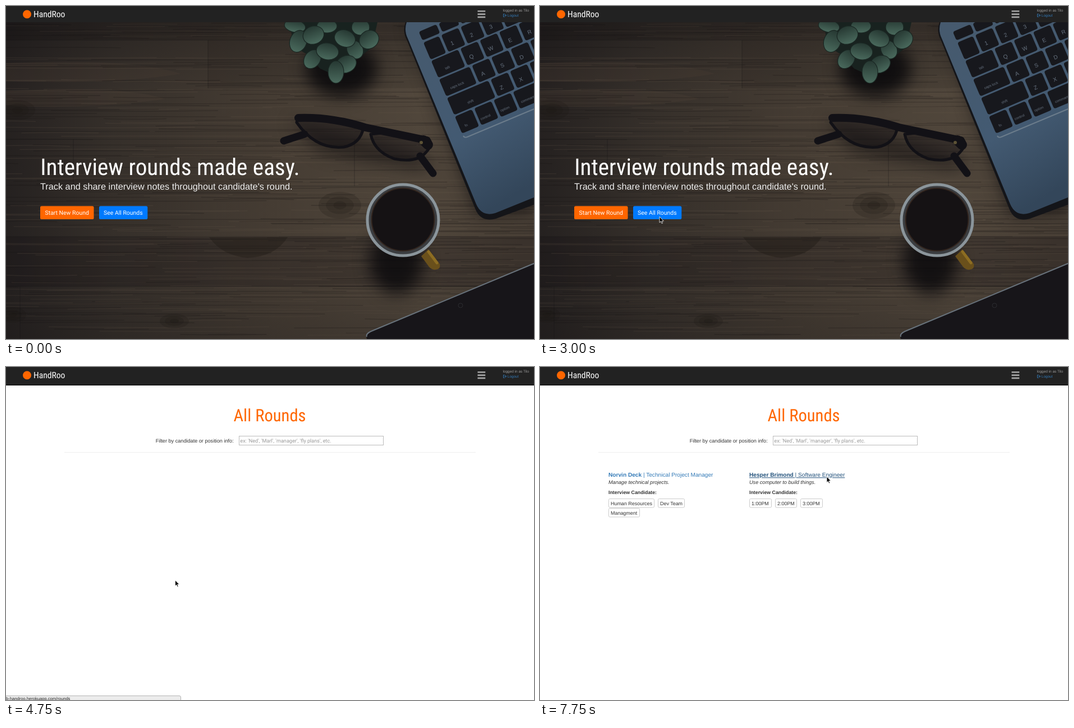
An HTML page for the animation above (8000 ms loop, 941 by 595 pixels).

```html
<!DOCTYPE html>
<html lang="en">
<head>
<meta charset="utf-8">
<title>Interview rounds</title>
<style>
html, body { margin: 0; width: 100%; height: 100%; overflow: hidden; background: #fff; }
svg { display: block; width: 941px; height: 595px; }
text { font: 9.15px "Liberation Sans", Arial, sans-serif; fill: #333; text-rendering: geometricPrecision; white-space: pre; }
.narrow { font-family: "Roboto Condensed", Roboto, sans-serif; font-stretch: 75%; }
.roboto { font-family: Roboto, sans-serif; }
#brand { font-size: calc(15.6px * var(--fit, 1)); fill: #fff; }
#title { font-size: calc(41.2px * var(--fit, 1)); fill: #fff; }
#heading { font-size: calc(30.6px * var(--fit, 1)); fill: #f60; }
.lead { font-size: 16.3px; fill: #f0f0f0; }
.button { font-size: 10.46px; fill: #fff; }
.small { font-size: 6.45px; fill: #9d9d9d; }
.link { font-size: 10.14px; fill: #337ab7; }
.link.hover { fill: #23527c; text-decoration: underline; }
.bold { font-weight: bold; }
.about { font-style: italic; }
.label { font-size: 8.8px; font-weight: bold; }
.tag { font-size: 8.95px; }
.box { fill: #fff; stroke: #ccc; }
.key { fill: #66717f; text-anchor: middle; }
</style>
</head>
<body>
<svg viewBox="0 0 941 595">
  <defs>
    <linearGradient id="wood">
      <stop offset="0" stop-color="#252120"/><stop offset=".2" stop-color="#352f2a"/>
      <stop offset=".5" stop-color="#453c33"/><stop offset=".78" stop-color="#50463b"/>
      <stop offset="1" stop-color="#463d34"/>
    </linearGradient>
    <linearGradient id="shade" x2="0" y2="1">
      <stop offset="0" stop-color="#0e0d10" stop-opacity=".36"/><stop offset=".25" stop-color="#0e0d10" stop-opacity="0"/>
      <stop offset=".75" stop-color="#0e0d10" stop-opacity="0"/><stop offset="1" stop-color="#0e0d10" stop-opacity=".2"/>
    </linearGradient>
    <linearGradient id="metal" x1=".2" x2=".6" y2="1">
      <stop offset="0" stop-color="#465a6e"/><stop offset=".6" stop-color="#435a72"/><stop offset="1" stop-color="#33465a"/>
    </linearGradient>
    <linearGradient id="leaf" x2="0" y2="1">
      <stop offset="0" stop-color="#263832"/><stop offset="1" stop-color="#4a6a5d"/>
    </linearGradient>
    <filter id="blur" x="-50%" y="-50%" width="200%" height="200%" color-interpolation-filters="sRGB">
      <feGaussianBlur stdDeviation="14"/>
    </filter>
  </defs>

  <g id="home">
    <rect width="941" height="595" fill="url(#wood)"/>
    <g fill="#0f0d0e">
      <rect y="29" width="941" height="32" opacity=".2"/>
      <rect x="360" y="61" width="400" height="86" opacity=".1"/>
      <rect y="412" width="941" height="89" opacity=".22"/>
    </g>
    <g fill="#4c4136" opacity=".3">
      <path d="M0 102Q220 92 312 121Q200 140 0 134ZM0 152Q210 142 284 166Q150 186 0 178Z"/>
    </g>
    <g fill="none" stroke-width="1.3">
      <path id="darkGrain" stroke="#141112" opacity=".26"/>
      <path id="lightGrain" stroke="#6b5b4a" opacity=".2"/>
    </g>
    <g id="knots" fill="#1d1713"></g>
    <path d="M362 413H502Q480 448 430 450Q385 446 362 413Z" fill="#201a15" opacity=".4"/>
    <path d="M0 61H760M0 238H941M120 322H941M0 412H941M0 501H941M360 61V147M120 238V322M621 238V322M25 501V595" fill="none" stroke="#151213" opacity=".35"/>
    <rect width="941" height="595" fill="url(#shade)"/>

    <g fill="#0c0b0d" filter="url(#blur)">
      <ellipse cx="598" cy="112" rx="64" ry="50" opacity=".9"/>
      <ellipse cx="696" cy="456" rx="48" ry="58" opacity=".85"/>
      <path d="M716 30L840 376L941 366V30Z" opacity=".6"/>
      <path d="M505 205L640 235L765 275L740 296L560 262Z" opacity=".5"/>
    </g>
    <path d="M506 29H662L652 74L622 98L596 128L560 112L536 86L512 72Z" fill="#18221f"/>
    <g id="leaves" fill="url(#leaf)" stroke="#1a2723" stroke-width="1.2"></g>

    <path d="M712 29Q706 46 715 62L837 364Q847 387 873 380L941 355V29Z" fill="#141519"/>
    <path d="M714 29Q709 44 716 58L838 354Q848 377 872 370L941 342V29Z" fill="url(#metal)"/>
    <path d="M815 232Q817 236 822 234L941 184" fill="none" stroke="#6b7c8b" stroke-width="2"/>
    <g id="keys" transform="translate(822 206) rotate(-23)"></g>

    <g fill="none" stroke="#121116" stroke-linejoin="round" stroke-linecap="round">
      <g fill="#121116" fill-opacity=".4" stroke-width="5">
        <path d="M518 208Q520 197 534 199Q592 200 637 217Q632 246 602 252Q552 257 518 208Z"/>
        <path d="M650 229Q700 222 754 239Q762 247 748 262Q731 281 692 273Q656 260 650 229Z"/>
      </g>
      <path d="M521 200Q580 198 640 217L750 240" stroke-width="14"/>
      <path d="M495 241L532 229M738 268L761 299" stroke-width="13"/>
      <path d="M744 240L752 248" stroke-width="18"/>
    </g>
    <circle cx="740" cy="244" r="3" fill="#5c5235"/>

    <path d="M740 447L753 435L773 461Q775 470 766 471Q759 472 754 466Z" fill="#6a501b"/>
    <path d="M753 439L768 459" stroke="#8d6d22" stroke-width="5" stroke-linecap="round"/>
    <circle cx="707.5" cy="382.5" r="63.5" fill="#3b3d40" stroke="#8b959b" stroke-width="5"/>
    <circle cx="707.5" cy="381.5" r="56" fill="#151214" stroke="#33261f" stroke-width="2"/>

    <path d="M643 595Q640 586 650 582L941 460V595Z" fill="#171519"/>
    <path d="M643 591Q641 586 650 581.5L941 460" fill="none" stroke="#68727b" stroke-width="2"/>
    <circle cx="810" cy="535" r="4" fill="none" stroke="#2b2b2f"/>

    <text id="title" class="narrow" x="61.3" y="302.2">Interview rounds made easy.</text>
    <text class="lead" x="61" y="327.5">Track and share interview notes throughout candidate's round.</text>
    <rect x="61" y="357.5" width="95.5" height="23.5" rx="2.6" fill="#f60"/>
    <text class="roboto button" x="69.5" y="373.3">Start New Round</text>
    <rect id="ring" x="165" y="356.7" width="88" height="25.2" rx="3.5" fill="#3f8fe8"/>
    <rect id="seeAll" x="166" y="357.5" width="86.3" height="23.5" rx="2.6"/>
    <text class="roboto button" x="174" y="373.3">See All Rounds</text>
  </g>

  <g id="list">
    <rect width="941" height="595" fill="#fff"/>
    <text id="heading" class="narrow" x="470" y="96.5" text-anchor="middle">All Rounds</text>
    <text x="266.7" y="134.7">Filter by candidate or position info:</text>
    <rect class="box" x="415.5" y="123.5" width="257" height="16" style="stroke:#bbb"/>
    <text class="roboto" x="417.3" y="134.6" style="fill:#999">ex: 'Ned', 'Marl', 'manager', 'fly plans', etc.</text>
    <path d="M104 152.5H837" stroke="#eee"/>
    <g id="rounds">
      <text id="first" class="link" x="122" y="196.3"><tspan class="bold">Norvin Deck</tspan> | Technical Project Manager</text>
      <text class="about" x="122" y="209">Manage technical projects.</text>
      <text class="label" x="122" y="227">Interview Candidate:</text>
      <text id="second" class="link" x="373" y="196.3"><tspan class="bold">Hesper Brimond</tspan> | Software Engineer</text>
      <text class="about" x="373" y="209">Use computer to build things.</text>
      <text class="label" x="373" y="227">Interview Candidate:</text>
    </g>
  </g>

  <rect id="bar" width="941" fill="#222"/>
  <path id="barEdge" d="M0 32.5H941" stroke="#080808"/>
  <circle cx="37.5" cy="14.8" r="7.5" fill="#f60"/>
  <text id="brand" class="narrow" x="49" y="20">HandRoo</text>
  <path d="M840.5 9.3H854.3M840.5 14.6H854.3M840.5 19.9H854.3" stroke="#a4a4a4" stroke-width="2.6"/>
  <text class="small" x="885.5" y="10.4">logged in as Tilo</text>
  <path d="M888.6 14.3H886.5V19.3H888.6M888 16.8H891.5M889.7 14.8L891.8 16.8L889.7 18.8" fill="none" stroke="#337ab7" stroke-width=".9"/>
  <text class="small" x="893.8" y="19.2" style="fill:#337ab7">Logout</text>

  <g id="status">
    <path id="statusBox" d="M-1 596V587.5H309Q311.5 587.5 311.5 590V596Z" stroke="#b4b4b4"/>
    <text x="0" y="595" style="font-size:7.6px;fill:#222">b-handroo.herokuapp.com/rounds</text>
  </g>
  <path id="cursor" d="M0 0V10.4L2.4 8.2L4 12L5.7 11.3L4.1 7.6H7.4Z" fill="#000" stroke="#fff" stroke-width=".8"/>
</svg>
<script>
const $ = id => document.getElementById(id);
const add = (id, markup) => $(id).insertAdjacentHTML('beforeend', markup);
const show = (id, on) => $(id).style.display = on ? '' : 'none';

// Smaller type where no condensed face is available
if ($('title').getComputedTextLength() > 490) document.body.style.setProperty('--fit', .885);

let seed = 7;
const random = () => (seed = seed * 16807 % 2147483647) / 2147483647;
function grain(count) {
  let d = '';
  for (let i = 0; i < count; i++) {
    const length = 80 + random() * 320, bend = random() * 6 - 3;
    d += `M${random() * 1000 - 100} ${30 + random() * 565}q${length / 2} ${bend} ${length} 0`;
  }
  return d;
}
$('darkGrain').setAttribute('d', grain(260));
$('lightGrain').setAttribute('d', grain(220));

for (const [x, y, rx, ry] of [[595, 356, 38, 24], [20, 186, 32, 18], [300, 563, 26, 13], [12, 552, 24, 14]])
  for (const k of [1, .65, .3])
    add('knots', `<ellipse cx="${x}" cy="${y}" rx="${rx * k}" ry="${ry * k}" opacity=".22"/>`);

// x, y, half width, half height, turn
for (const [x, y, rx, ry, turn] of [
  [515, 36, 19, 11, 10], [572, 36, 18, 12, 0], [632, 38, 16, 14, 0], [521, 63, 15, 20, 20],
  [548, 52, 19, 16, -20], [622, 78, 14, 17, -30], [647, 60, 18, 16, -35], [604, 58, 19, 15, 20],
  [546, 95, 14, 18, 35], [573, 81, 20, 15, 10], [606, 104, 19, 15, -25], [588, 118, 14, 20, 0]
]) add('leaves', `<ellipse rx="${rx}" ry="${ry}" transform="translate(${x} ${y}) rotate(${turn})"/>`);

// Row top, height, width of the first key, labels
const gap = 4.5, keySize = 33;
[
  [-181, 17, 34, ' ,,,,,,'],
  [-160, keySize, 30, ' ,1,2,3,4,5'],
  [-124.5, keySize, 52, 'tab,Q,W,E,R'],
  [-88.5, keySize, 59, 'caps lock,A,S,D,F'],
  [-52.5, keySize, 80, 'shift,Z,X,C'],
  [-16.5, keySize, keySize, 'fn,control,option,command']
].forEach(([y, height, first, labels]) => {
  let x = -17;
  labels.split(',').forEach((label, i) => {
    const width = i ? label === 'command' ? 48 : keySize : first;
    const size = label.length > 1 ? 6.3 : 10;
    add('keys', `<rect x="${x}" y="${y}" width="${width}" height="${height}" rx="4" fill="#17181d"/>
      <text class="key" x="${x + width / 2 - 4}" y="${y + height * .74}" style="font-size:${size}px">${label}</text>`);
    x += width + gap;
  });
});

for (const [x, y, width, label] of [
  [122, 235, 81, 'Human Resources'], [210, 235, 47, 'Dev Team'], [122, 252, 55, 'Managment'],
  [373, 235, 39, '1:00PM'], [419, 235, 38, '2:00PM'], [464, 235, 39, '3:00PM']
]) add('rounds', `<rect class="box" x="${x + .5}" y="${y + .5}" width="${width}" height="15.5" rx="2"/>
  <text class="tag" x="${x + 4}" y="${y + 11.6}">${label}</text>`);

// Time, x, y: the pointer jumps from place to place
const pointer = [
  [250, 853, 50], [500, 560, 329], [1000, 547, 336], [1250, 253, 461], [1500, 166, 457],
  [1750, 162, 383], [2000, 169, 380], [2250, 193, 379], [2500, 208, 379], [2750, 209, 377],
  [3000, 213, 376.5], [3750, 215, 374], [4000, 215.5, 373], [4750, 301.5, 381], [5250, 375, 381],
  [5500, 371, 374], [5750, 232, 311], [6000, 284, 261], [7000, 267.5, 219], [7250, 300, 185],
  [7500, 500, 203], [7750, 511, 196]
];

function draw(now) {
  const t = now % 8000, onList = t >= 4750;
  show('home', !onList);
  show('list', onList);
  show('rounds', t >= 5000);
  show('barEdge', onList);
  $('bar').setAttribute('height', onList ? 33 : 29);
  show('ring', t >= 4500);
  $('seeAll').setAttribute('fill', t >= 3750 ? '#0062cc' : '#007aff');
  show('status', t >= 4000 && t < 5250);
  $('status').setAttribute('opacity', t >= 5000 ? .5 : 1);
  $('statusBox').setAttribute('fill', onList ? '#ececec' : '#fafafa');
  $('first').classList.toggle('hover', t >= 7250 && t < 7500);
  $('second').classList.toggle('hover', t >= 7750);

  const place = pointer.findLast(p => p[0] <= t);
  show('cursor', place);
  if (place) $('cursor').setAttribute('transform', `translate(${place[1]} ${place[2]})`);
  requestAnimationFrame(draw);
}
draw(0);
</script>
</body>
</html>
```
